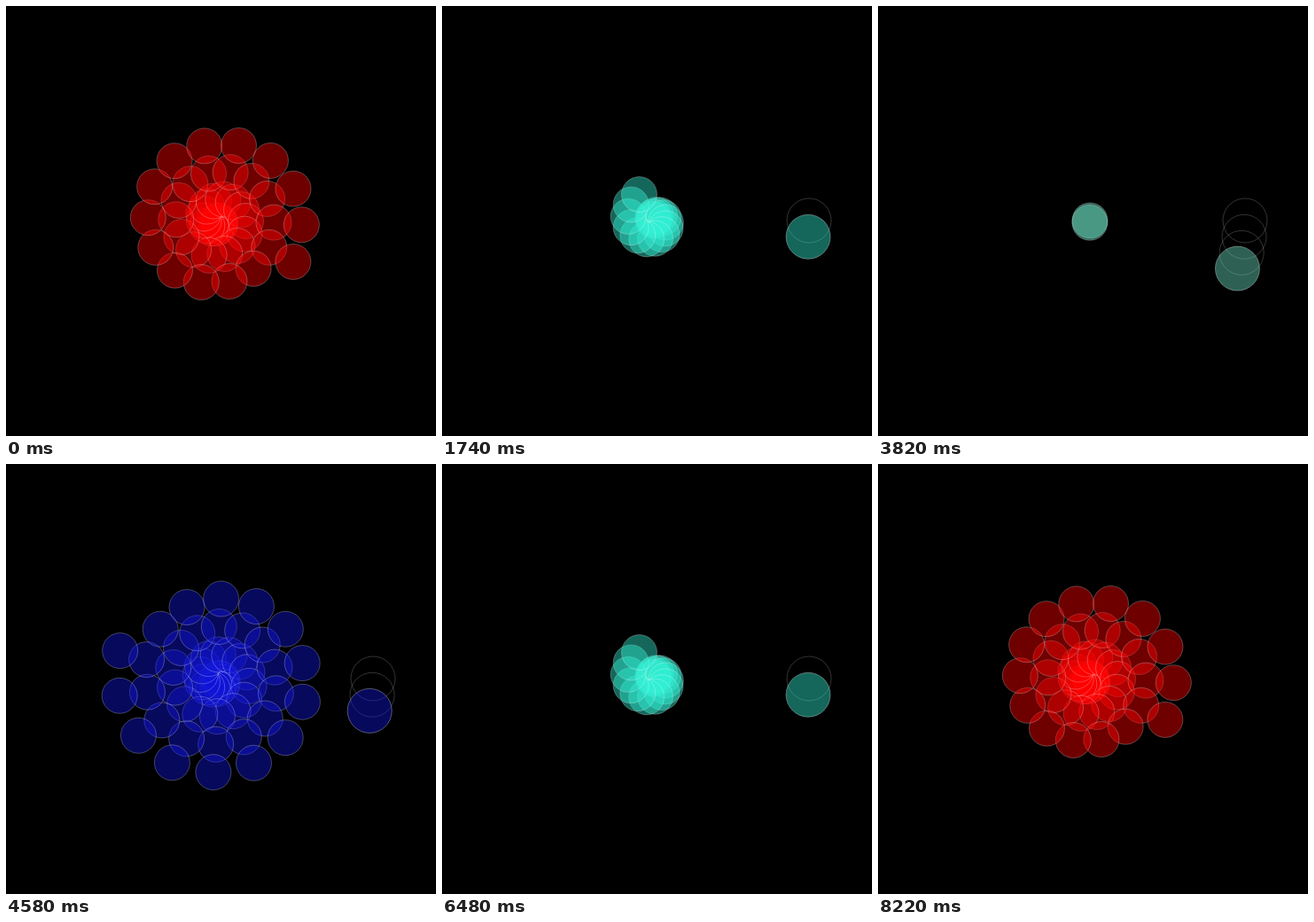
Animation of 485x485 px, one loop 8.24 s. Source, as an HTML page:

```html
<!DOCTYPE html>
<html lang="en">
<head>
<meta charset="utf-8">
<title>Spiral clock</title>
<style>
  html, body { margin: 0; width: 100%; height: 100%; overflow: hidden; background: #000; }
  svg { display: block; width: 100%; height: 100%; }
</style>
</head>
<body>
<svg id="stage" viewBox="0 0 485 485"></svg>
<script>
const STEP_MS = 20;
const FORWARD = 206;            // steps before the motion runs backwards
const CENTER = { x: 239, y: 242 };
const TURN = 0.45;              // radians between neighbouring dots
const GROWTH = 2.25;            // spiral radius gained per dot
const DOTS = 59;
const ORBIT = 175;
const TICK = Math.PI / 30;
const COLORS = ["rgb(200,140,60)", "rgb(50,238,212)", "rgb(17,21,215)", "rgb(108,226,196)"];
const FIRST_COLOR = "rgb(255,0,0)";

const stage = document.getElementById("stage");

function addCircle(radius, angle, size) {
  const circle = document.createElementNS("http://www.w3.org/2000/svg", "circle");
  circle.setAttribute("r", size);
  circle.setAttribute("stroke", "#fff");
  circle.setAttribute("fill-opacity", 0.43);
  stage.appendChild(circle);
  place(circle, radius, angle);
  return circle;
}

function place(circle, radius, angle) {
  circle.setAttribute("cx", CENTER.x + radius * Math.cos(angle));
  circle.setAttribute("cy", CENTER.y + radius * Math.sin(angle));
}

function show(circle, visible, fill, strokeOpacity) {
  circle.setAttribute("visibility", visible ? "visible" : "hidden");
  circle.setAttribute("fill", fill);
  circle.setAttribute("stroke-opacity", strokeOpacity);
}

const markers = COLORS.map((_, i) => addCircle(ORBIT, i * TICK, 25));
const dots = Array.from({ length: DOTS }, () => addCircle(0, 0, 20));

// The opening spiral pauses, then each new spiral grows dot by dot.
function stateAt(step) {
  if (step < 15) return { cycle: -1, last: 43 + Math.min(step, 6) };
  const grown = step - 13;
  return { cycle: Math.floor(grown / DOTS), last: grown % DOTS };
}

function render(time) {
  const step = Math.floor(time / STEP_MS) % (2 * FORWARD);
  const { cycle, last } = stateAt(step < FORWARD ? step : 2 * FORWARD - 1 - step);
  const color = cycle < 0 ? FIRST_COLOR : COLORS[cycle];
  const turnOffset = 60 * (cycle + 1);

  markers.forEach((marker, i) => {
    const current = i === cycle;
    show(marker, i <= cycle, current ? color : "none", current ? 0.32 : 0.2);
  });
  dots.forEach((dot, n) => {
    place(dot, GROWTH * n, TURN * (n + turnOffset));
    show(dot, n <= last, color, 0.25);
  });
}

let start;
function tick(now) {
  start ??= now;
  render(now - start);
  requestAnimationFrame(tick);
}
render(0);
requestAnimationFrame(tick);
</script>
</body>
</html>
```
